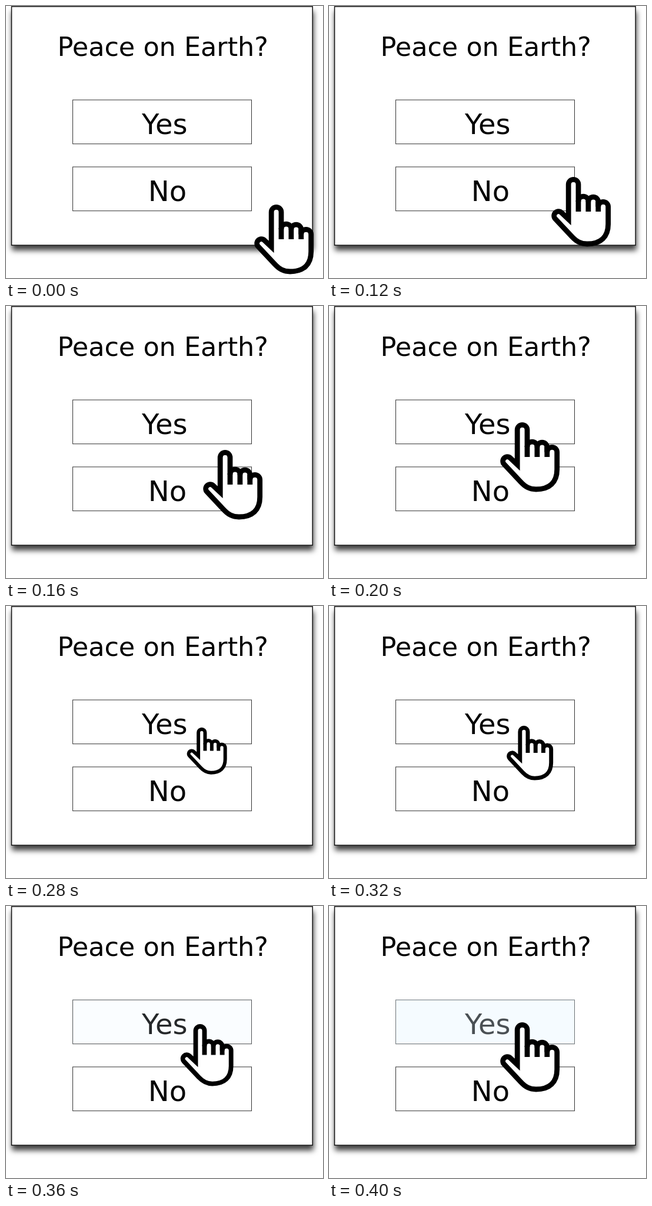
Recreate the animation shown at these times as an HTML page. Size 539x463 px, loop 440 ms.

```html
<!DOCTYPE html>
<html lang="en">
<head>
<meta charset="utf-8">
<title>Peace on Earth?</title>
<style>
  html, body { margin: 0; width: 100%; height: 100%; overflow: hidden; background: #fff; }
  .card {
    position: absolute; left: 9px; top: 1px; width: 513px; height: 407px;
    background: #fff; box-shadow: 1px 8px 9px rgba(0, 0, 0, .75);
  }
  svg { position: absolute; left: 0; top: 0; }
  text { font: 48px "DejaVu Sans", Verdana, sans-serif; }
  .title { font-size: 44.5px; }
  .edge { fill: none; stroke: #111; stroke-width: 1.5; }
  .box { fill: none; stroke: #333; }
  #hand { fill: #fff; stroke: #000; stroke-width: 8.8; stroke-miterlimit: 10; }
</style>
</head>
<body>
<div class="card"></div>
<svg width="539" height="463" viewBox="0 0 539 463">
  <rect class="edge" x="9.5" y="0.9" width="511.7" height="406.3"/>
  <text class="title" x="87.5" y="85">Peace on Earth?</text>
  <text x="231" y="217.5">Yes</text>
  <text x="241.8" y="331.5">No</text>
  <rect class="box" x="113.5" y="159.9" width="304" height="74.8"/>
  <rect class="box" x="113.5" y="273.9" width="304" height="74.8"/>
  <rect id="glow" x="113" y="159" width="305" height="76" fill="#e1f3ff"/>
  <g id="hand">
    <path d="M46 42 V12.8 A8.4 8.4 0 0 0 29.2 12.8 V72 L17.3 60.7
      A7.5 7.5 0 0 0 6.7 71.3 L35 101.5 C43 110 50 114 61 114
      C84 114 96.7 102 96.7 80 V50.8 A8.45 8.45 0 0 0 79.8 50.8
      V42.5 A8.45 8.45 0 0 0 62.9 42.5 V41.5 A8.45 8.45 0 0 0 46 41.5 Z"/>
    <path d="M46 40 V59 M62.9 41 V59 M79.8 42 V59"/>
  </g>
</svg>
<script>
  const LOOP = 440, STEP = 40, HOLD = 120;
  const ARRIVE = 3, PRESS = 5, RELEASE = 8;
  const SMALL = 0.675, PIVOT = [50.5, 27];
  const hand = document.getElementById('hand');
  const glow = document.getElementById('glow');

  const clamp = v => Math.min(1, Math.max(0, v));
  const progress = (step, from, to) => clamp((step - from) / (to - from));

  function draw(time) {
    const step = time < HOLD ? 0 : 1 + Math.floor((time - HOLD) / STEP);
    const travel = progress(step, 0, ARRIVE);
    const x = Math.round(422 - 131 * travel);
    const y = Math.round(338 - 140 * travel);
    const pressed = progress(step, ARRIVE, PRESS) - progress(step, PRESS, RELEASE);
    const scale = 1 - (1 - SMALL) * pressed;
    const [px, py] = PIVOT;

    hand.setAttribute('transform',
      `translate(${x + px} ${y + py}) scale(${scale}) translate(${-px} ${-py})`);
    glow.setAttribute('opacity', 0.33 * progress(step, RELEASE - 2, RELEASE));
  }

  const start = performance.now();
  function frame() {
    draw((performance.now() - start) % LOOP);
    requestAnimationFrame(frame);
  }
  frame();
</script>
</body>
</html>
```
